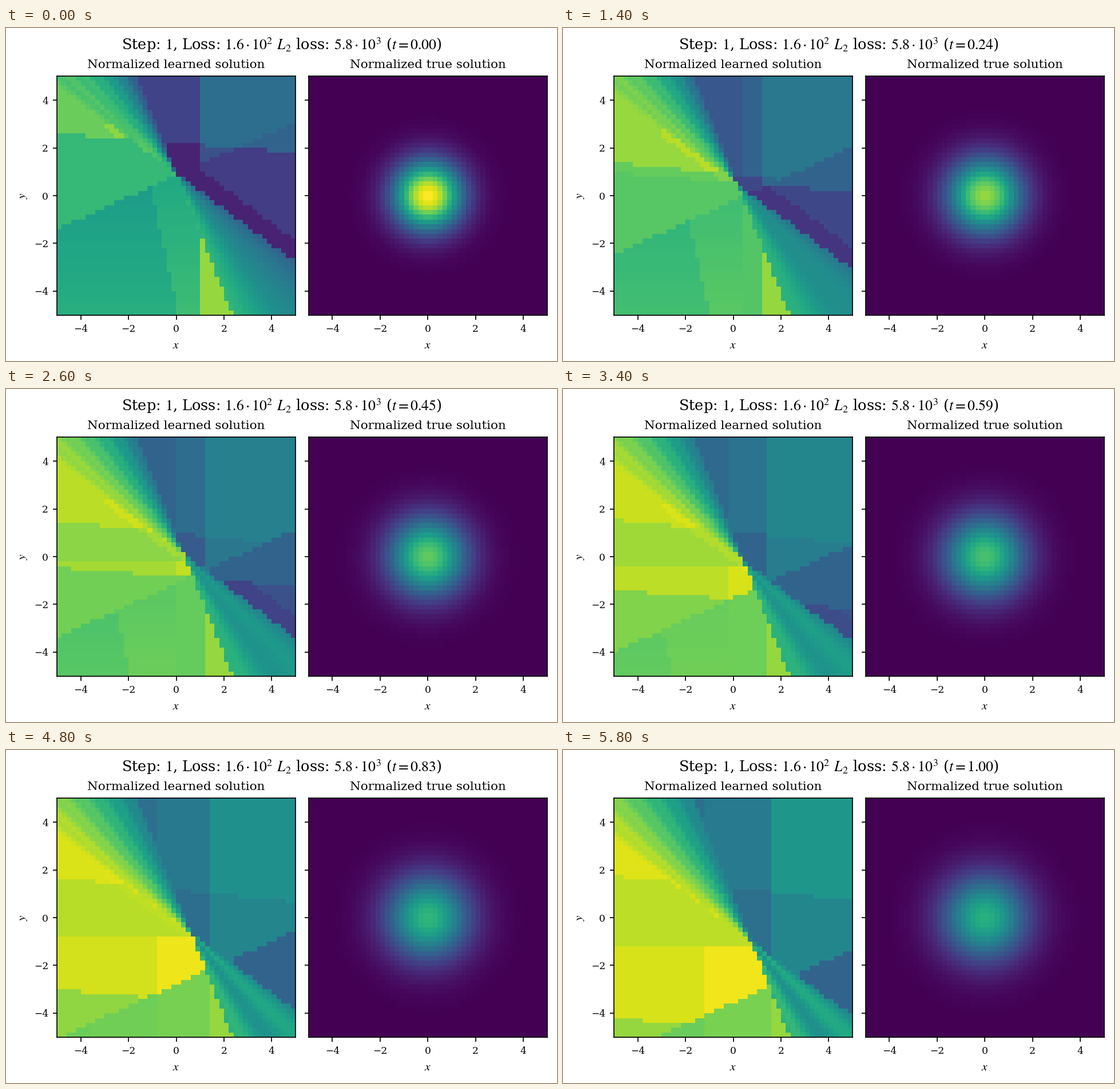
Recreate the animation shown at these times as a matplotlib script. Size 963x582 px, loop 6000 ms.

```python
import numpy as np
import matplotlib.pyplot as plt
from matplotlib.animation import FuncAnimation

W, H, DPI = 963, 582, 96
FRAMES, INTERVAL = 30, 200
PX = 72 / DPI

plt.rcParams.update({
    "font.family": "DejaVu Serif",
    "mathtext.fontset": "stix",
    "axes.linewidth": 1.7 * PX,
})

grid = np.linspace(-4.9, 4.9, 50)
X, Y = np.meshgrid(grid, grid)


def learned(t):
    """Flat regions cut by straight creases that drift linearly in t."""
    ease = 1 - (1 - t) ** 2

    def mix(a, b):
        return a + (b - a) * ease

    # Two creases split the plane into left, right and two narrow fans
    crease = 0.93 - 1.35 * t - 0.74 * X
    above = Y > crease
    past = X > 0.35 - 0.4 * Y

    above_slant = Y > 0.45 * X + 0.85 - 4.4 * t
    above_fall = Y > 2.2 - 6.8 * t - 0.08 * X
    above_rise = Y > 0.75 + 0.5 * t - 0.1 * X
    above_level = Y > 0.75 - 1.95 * t
    past_tilt = X > -1 - 4.5 * t - 0.22 * Y
    past_inner = X > 1 - 2.2 * t
    past_outer = X > 1.05 + 0.5 * t

    # Left
    base = mix(0.57, 0.77) + (0.06 * past_tilt - 0.015 * (Y + 1)) * (1 - t)
    base = np.where(past_inner, mix(0.68, 0.80), base)
    base = np.where(past_outer, 0.84, base)
    band = np.where(above_level, mix(0.66, 0.90), mix(0.70, 0.94))
    band = band + 0.04 * (past_inner & ~above_level)
    band = np.where(above_rise, mix(0.77, 0.95), band)
    ridge = (Y > crease - 0.35) & (X > -3)
    band = band + 0.06 * (1 - t) * ridge
    band = np.where(above_fall, band, mix(0.67, 0.84))
    left = np.where(above_slant, band, base)

    # Right
    top = np.where(past_inner, mix(0.25, 0.41), mix(0.20, 0.37))
    top = np.where(past_outer, 0.36 + 0.17 * t, top)
    under = np.where(past_outer, mix(0.25, 0.46), mix(0.10, 0.37))
    top = np.where(above_fall & above_rise, top, under)
    side = 0.18 + 0.15 * t - 0.08 * (1 - t) * (Y < crease + 0.9)
    side = np.where(above_fall, 0.32, side)
    right = np.where(above_slant, top, side)

    # Fans, shaded by angle around the point where the creases meet
    cx, cy = 0.74 * t - 0.03, 0.95 - 1.91 * t
    angle = np.degrees(np.arctan2(Y - cy, X - cx)) % 180
    u = np.clip((angle - 111.8) / 31.7, 0, 1)
    rise = 1 - (1 - u) ** mix(2, 1.2)
    upper = mix(0.24, 0.43) + mix(0.49, 0.50) * rise
    upper = upper + 0.02 * np.sin(40 * u)
    lower = mix(0.66, 0.61) + mix(-0.34, -0.09) * u
    lower = lower + (0.01 + 0.06 * t) * np.cos(10 * (u - 0.77))

    return np.where(past, np.where(above, right, lower),
                    np.where(above, upper, left))


def true(t):
    var = 1 + 0.957 * (1 - np.exp(-0.95 * t))
    return np.exp(-(X**2 + Y**2 - 0.02) / (2 * var)) / var


def panel(left, title, labels):
    ax = fig.add_axes([left / W, 1 - 501.7 / H, 417 / W, 417.4 / H])
    im = ax.imshow(true(0), origin="lower", extent=(-5, 5, -5, 5),
                   cmap="viridis", vmin=0, vmax=1,
                   interpolation="nearest", aspect="auto")
    ticks = range(-4, 5, 2)
    ax.set_xticks(ticks)
    ax.set_yticks(ticks)
    ax.tick_params(length=7.5 * PX, width=1.7 * PX, pad=7.5 * PX,
                   labelsize=17.1 * PX, labelleft=labels)
    ax.tick_params(axis="x", pad=8.5 * PX)
    ax.set_title(title, fontsize=21.4 * PX, pad=14.6 * PX)
    fig.text((left + 208.5) / W, 1 - 560 / H, "$x$", ha="center",
             va="baseline", fontsize=21.4 * PX)
    return im


fig = plt.figure(figsize=(W / DPI, H / DPI), dpi=DPI, facecolor="white")
left_im = panel(89, "Normalized learned solution", True)
right_im = panel(528.7, "Normalized true solution", False)
fig.text(31 / W, 1 - 293 / H, "$y$", rotation=90, ha="center", va="center",
         fontsize=21.4 * PX)
heading = fig.text(482 / W, 1 - 38 / H, "", ha="center", va="baseline",
                   fontsize=25.6 * PX)


def update(i):
    t = i / (FRAMES - 1)
    left_im.set_data(np.clip(learned(t), 0, 1))
    right_im.set_data(true(t))
    heading.set_text(r"Step: $1$, Loss: $1.6 \cdot 10^{2}$ $L_2$ loss: "
                     rf"$5.8 \cdot 10^{{3}}$ ($t={t:.2f}$)")
    return left_im, right_im, heading


anim = FuncAnimation(fig, update, frames=FRAMES, interval=INTERVAL,
                     repeat=True, repeat_delay=0, blit=False)
plt.show()
```
